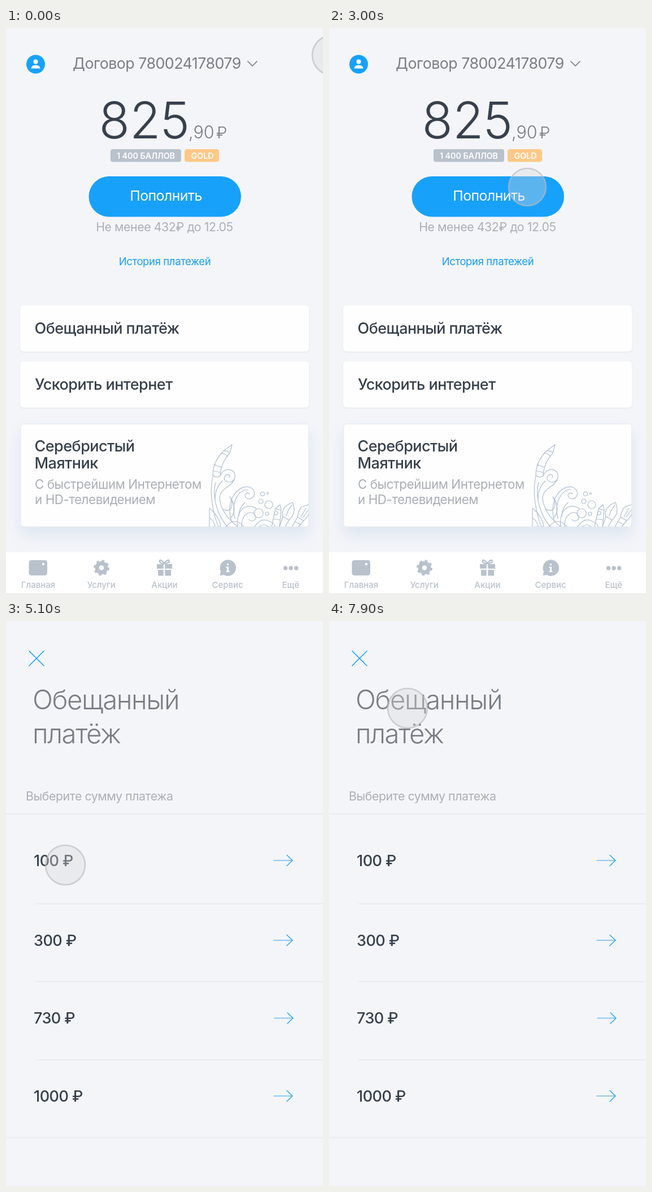
Animation, 561 px wide and 998 px high, one loop 8000 ms. Source, as an HTML page:

```html
<!DOCTYPE html>
<html lang="ru">
<head>
<meta charset="utf-8">
<style>
  html, body { margin: 0; width: 100%; height: 100%; overflow: hidden; background: #f3f5f9; }
  svg { display: block; width: 100%; height: 100%; }
  text { font-family: Inter, Roboto, sans-serif; font-optical-sizing: none; letter-spacing: -.02em; fill: #37414d; }
  .even { letter-spacing: 0; }
  .mid text, text.mid { text-anchor: middle; }
  .medium { font-weight: 500; }
  .light { font-weight: 300; }
  .gray { fill: #7a7e86; }
  .pale { fill: #abafb6; }
  .blue { fill: #189ff3; }
  .white { fill: #fff; }
  .title { font-size: 47.3px; letter-spacing: -.03em; }
  .row { font-size: 27px; }
  .line { fill: none; stroke-linecap: round; stroke-linejoin: round; }
  .card { fill: #fefefe; filter: drop-shadow(0 1px 1px rgba(60, 70, 90, .1)); }
  .promo { fill: #fefefe; stroke: #e3e9f0; filter: drop-shadow(0 14px 13px rgba(150, 178, 212, .22)); }
  #cursor { fill: rgba(214, 214, 214, .36); stroke: rgba(185, 187, 190, .65); stroke-width: 2.5; }
</style>
</head>
<body>
<svg viewBox="0 0 561 998" preserveAspectRatio="none">
  <defs>
    <clipPath id="artBox"><path d="M359 730H535.500V881H359Z"/></clipPath>
    <g id="title">
      <text class="title light gray" x="47" y="156">Обещанный</text>
      <text class="title light gray" x="47" y="216">платёж</text>
    </g>
    <g id="arrow" class="line" stroke-width="1.6">
      <path d="M474 0H506" stroke="#6dbbf2"/>
      <path d="M497-9.500L507 0L497 9.500" stroke="#2fa6f3"/>
    </g>
  </defs>

  <g id="home">
    <g data-dir="-1" data-lag="27">
      <circle cx="52.500" cy="64" r="16.500" fill="#18a1fa"/>
      <circle cx="52.500" cy="59.500" r="4" class="white"/>
      <path class="white" d="M44.500 71.500Q45 65.500 52.500 65.500T60.500 71.500Z"/>
      <text class="gray" x="118" y="72" font-size="26.800">Договор 780024178079</text>
      <path class="line" d="M428 59L436 67L444 59" stroke="#8a8e95" stroke-width="1.8"/>
    </g>
    <g data-dir="-1" data-lag="50">
      <text class="light even" x="164.500" y="195" font-size="89">825</text>
      <text class="light even gray" x="323" y="195" font-size="30.500">,90</text>
      <text class="light gray" x="372" y="195" font-size="29">₽</text>
    </g>
    <g data-dir="-1" data-lag="62" class="mid" font-weight="600" font-size="14.300">
      <rect x="185" y="214" width="125" height="22.500" rx="4" fill="#b9c1cb"/>
      <rect x="316" y="214" width="61" height="22.500" rx="4" fill="#ffc888"/>
      <text class="white even" x="247.500" y="230.500">1 400 БАЛЛОВ</text>
      <text class="white even" x="347.500" y="230.500">GOLD</text>
    </g>
    <g data-dir="-1" data-lag="81">
      <rect x="146.500" y="262" width="269.500" height="71.500" rx="35.700" fill="#18a1fb"/>
      <text class="white mid" x="283" y="305" font-size="24.800">Пополнить</text>
    </g>
    <g data-dir="-1" data-lag="118" class="mid">
      <text class="pale" x="280.500" y="359" font-size="21.300">Не менее 432₽ до 12.05</text>
      <text class="blue" x="281" y="418.500" font-size="18.500">История платежей</text>
    </g>
    <g data-dir="1" data-lag="118">
      <rect class="card" x="25" y="490" width="511" height="81.500" rx="6"/>
      <text class="row medium" x="50.500" y="540">Обещанный платёж</text>
    </g>
    <g data-dir="1" data-lag="81">
      <rect class="card" x="25" y="589" width="511" height="81.500" rx="6"/>
      <text class="row medium" x="51" y="639">Ускорить интернет</text>
    </g>
    <g data-dir="1" data-lag="50">
      <rect class="promo" x="26" y="699.500" width="509.500" height="181.500" rx="5"/>
      <text class="row medium" x="50.500" y="748">Серебристый</text>
      <text class="row medium" x="50.500" y="778">Маятник</text>
      <text class="pale" x="51" y="814" font-size="22.400">С быстрейшим Интернетом</text>
      <text class="pale" x="51" y="841" font-size="22.400">и HD-телевидением</text>
      <g clip-path="url(#artBox)" class="line" stroke="#afbfd2" stroke-width="1.200">
        <path d="M400 736L385 747Q366 766 366 790Q372 796 379 791Q380 768 396 751ZM385 747Q392 746 396 751M381 751Q388 751 392 757M368 771L381 776M366 782L379 785"/>
        <path d="M366 790Q361 815 365 840T376 881M379 791C386 774 408 778 405 794C401 808 382 802 387 792C391 786 398 789 395 794M405 794C401 812 380 810 378 830Q380 857 410 881M371 803C364 826 374 862 392 881M383 800Q370 812 370 832"/>
        <path d="M360 848Q372 858 378 872T366 881M361 866Q368 870 370 881M360 850V881M384 850C399 858 404 842 396 828C403 836 409 854 397 866"/>
        <path d="M399 871C388 838 408 806 431 811C446 817 439 835 427 831C418 826 426 818 431 823M405 866C398 838 411 816 428 815M410 881C406 853 425 836 443 849M417 881C416 861 430 851 439 858C448 868 434 875 430 868"/>
        <path d="M440 881Q450 865 463 870T476 881M448 881Q456 874 464 881M423 838Q412 848 412 862M389 881Q405 862 421 881"/>
        <g id="bubbles"></g>
        <path d="M470 881L477 849L485 842L487 852L484 881M477 849L487 852M473 867L485 869"/>
        <path d="M507 838Q486 846 490 863L501 869Q515 857 507 838ZM506 843Q499 850 496 862M490 863L484 881M501 869L494 881"/>
        <path d="M539 841L523 846Q517 853 516 864L527 870Q536 863 538 851M531 848L522 863M535 851L525 865M516 864L506 881M527 870L518 881M511 872L522 877"/>
      </g>
    </g>
    <g data-dir="1" data-lag="0">
      <rect x="0" y="926" width="561" height="130" class="white"/>
      <g fill="#b9c1cc">
        <rect x="40.500" y="940" width="32.500" height="27" rx="4.500"/>
        <circle cx="66" cy="947" r="2.200" class="white"/>
        <circle cx="169" cy="953.500" r="11.500"/>
        <circle cx="169" cy="953.500" r="11.700" fill="none" stroke="#b9c1cc" stroke-width="4.500" stroke-dasharray="4.600 4.589"/>
        <circle cx="169" cy="953.500" r="4.200" class="white"/>
        <path d="M267 947H278.700V955H267ZM281.300 947H294V955H281.300ZM269 957H278.700V967.500H269ZM281.300 957H292V967.500H281.300Z"/>
        <path class="line" d="M280 946C270 946 270 938 275 940.500Q279 943 280 946C291 946 291 938 285.500 940.500Q281 943 280 946" stroke="#b9c1cc" stroke-width="2.500"/>
        <path d="M378.500 967L380 960A14.300 14.300 0 1 1 386 966.200Z"/>
        <path d="M391 946h3v3h-3zM389.500 951.500H394V959H395.500V961H389.500V959H391V953.500H389.500Z" class="white"/>
        <circle cx="494.500" cy="954" r="3.700"/><circle cx="504" cy="954" r="3.700"/><circle cx="513.700" cy="954" r="3.700"/>
      </g>
      <g id="tabs" class="mid medium" font-size="15"></g>
    </g>
  </g>

  <g id="list">
    <g id="listHead">
      <path class="line" d="M41 53L67 79M67 53L41 79" stroke="#189ff3" stroke-width="1.600"/>
      <use href="#title"/>
    </g>
    <g id="listBody">
      <text class="pale" x="35" y="317" font-size="21.300">Выберите сумму платежа</text>
      <path d="M0 341H561M52 499.500H561M52 637H561M52 775H561M0 912.500H561" stroke="#e9ebef" stroke-width="2"/>
      <g id="sums" class="medium" font-size="27"></g>
    </g>
  </g>

  <g id="detail">
    <path class="line" d="M64 53.500L52 65.500L64 77.500" stroke="#189ff3" stroke-width="1.600"/>
    <use href="#title"/>
    <g font-size="24.400">
      <text x="48.500" y="284">Вы собираетесь взять обещанный</text>
      <text x="48.500" y="318.500">платёж на сумму</text>
      <text class="medium" x="48" y="370" font-size="36">100 ₽</text>
      <text x="50" y="419">Нажимая кнопку «Взять платёж»,</text>
      <text x="50.500" y="453.500">вы соглашаетесь с условиями</text>
      <text class="blue" x="50.500" y="488">оферты</text>
    </g>
    <rect x="52" y="549" width="460" height="64.500" rx="32.200" fill="#18a1fb"/>
    <text class="white mid" x="282" y="589.500" font-size="24.700">Взять платёж</text>
  </g>

  <circle id="cursor"/>
</svg>
<script>
const LOOP = 8000, STEP = 100, WIDTH = 561;
const byId = id => document.getElementById(id);

byId('tabs').innerHTML = ['Главная', 'Услуги', 'Акции', 'Сервис', 'Ещё']
  .map((name, i) => `<text class="even" style="fill:#b9c1cc" x="${57 + i * 111.7}" y="989">${name}</text>`).join('');

byId('sums').innerHTML = [[100, 423], [300, 564], [730, 701.5], [1000, 839]]
  .map(([sum, y]) => `<text x="49" y="${y + 9.5}">${sum} ₽</text>
    <use href="#arrow" x="${sum === 730 ? 1 : 0}" y="${y}"/>`).join('');

byId('bubbles').innerHTML = [[447, 857, 8], [465, 842, 7], [451, 836, 4], [454, 823, 3.5], [463, 822, 1.5], [478, 857, 3], [462, 858, 3]]
  .map(([x, y, r]) => `<circle cx="${x}" cy="${y}" r="${r}"/>`).join('');

// time, x, y, radius
const cursorPath = [
  [100, 577, 48, 35], [800, 361, 246, 35], [900, 368, 224, 35], [1200, 438, 248, 35],
  [1500, 438, 248, 35], [1600, 423, 184, 35], [1700, 423, 184, 35], [1800, 436, 176, 35],
  [2200, 436, 176, 35], [3000, 351, 281, 33], [3100, 339, 290, 33], [3200, 339, 290, 35],
  [3800, 211, 532, 35], [4600, 211, 532, 35], [5100, 105, 431, 35], [5400, 105, 431, 35],
  [6100, 102, 427, 35], [6400, 102, 427, 35], [6900, 58, 52, 35], [7100, 58, 67, 35],
  [7200, 58, 67, 35], [7900, 139, 154, 35]
];

const ratio = (t, from, to) => Math.min(1, Math.max(0, (t - from) / (to - from)));
const easeInOut = r => r < .5 ? 2 * r * r : 1 - 2 * (1 - r) ** 2;
const ease = (t, from, to) => easeInOut(ratio(t, from, to));

function place(node, x, y, opacity = 1) {
  node.setAttribute('transform', `translate(${x} ${y})`);
  node.setAttribute('opacity', opacity);
  node.style.display = opacity > 0 ? '' : 'none';
}

function cursorAt(t) {
  const next = cursorPath.findIndex(key => key[0] > t);
  if (next === 0) return cursorPath[0].slice(1);
  if (next < 0) return cursorPath.at(-1).slice(1);
  const a = cursorPath[next - 1], b = cursorPath[next];
  const p = ease(t, a[0], b[0]);
  return [1, 2, 3].map(i => a[i] + (b[i] - a[i]) * p);
}

const homeParts = [...document.querySelectorAll('#home > g')];

function draw(t) {
  // The outer parts of the home screen leave first.
  for (const part of homeParts) {
    const start = 3748 + Number(part.dataset.lag);
    const gone = ease(t, start, start + 450);
    place(part, 0, 62 * gone * part.dataset.dir, 1 - gone);
  }

  const headShown = ease(t, 3940, 4450);
  const bodyShown = ease(t, 4000, 4500);
  place(byId('listHead'), 0, -30 * (1 - headShown), headShown);
  place(byId('listBody'), 0, 30 * (1 - bodyShown), bodyShown);

  const slide = ease(t, 5450, 6050) - ease(t, 7200, 7850);
  place(byId('list'), -WIDTH * slide, 0);
  place(byId('detail'), WIDTH * (1 - slide), 0, slide > 0 ? 1 : 0);

  const [x, y, r] = cursorAt(t);
  const cursor = byId('cursor');
  cursor.setAttribute('cx', x);
  cursor.setAttribute('cy', y);
  cursor.setAttribute('r', r);
}

const started = performance.now();
function frame() {
  const t = (performance.now() - started) % LOOP;
  draw(Math.floor(t / STEP) * STEP);
  requestAnimationFrame(frame);
}
frame();
</script>
</body>
</html>
```
